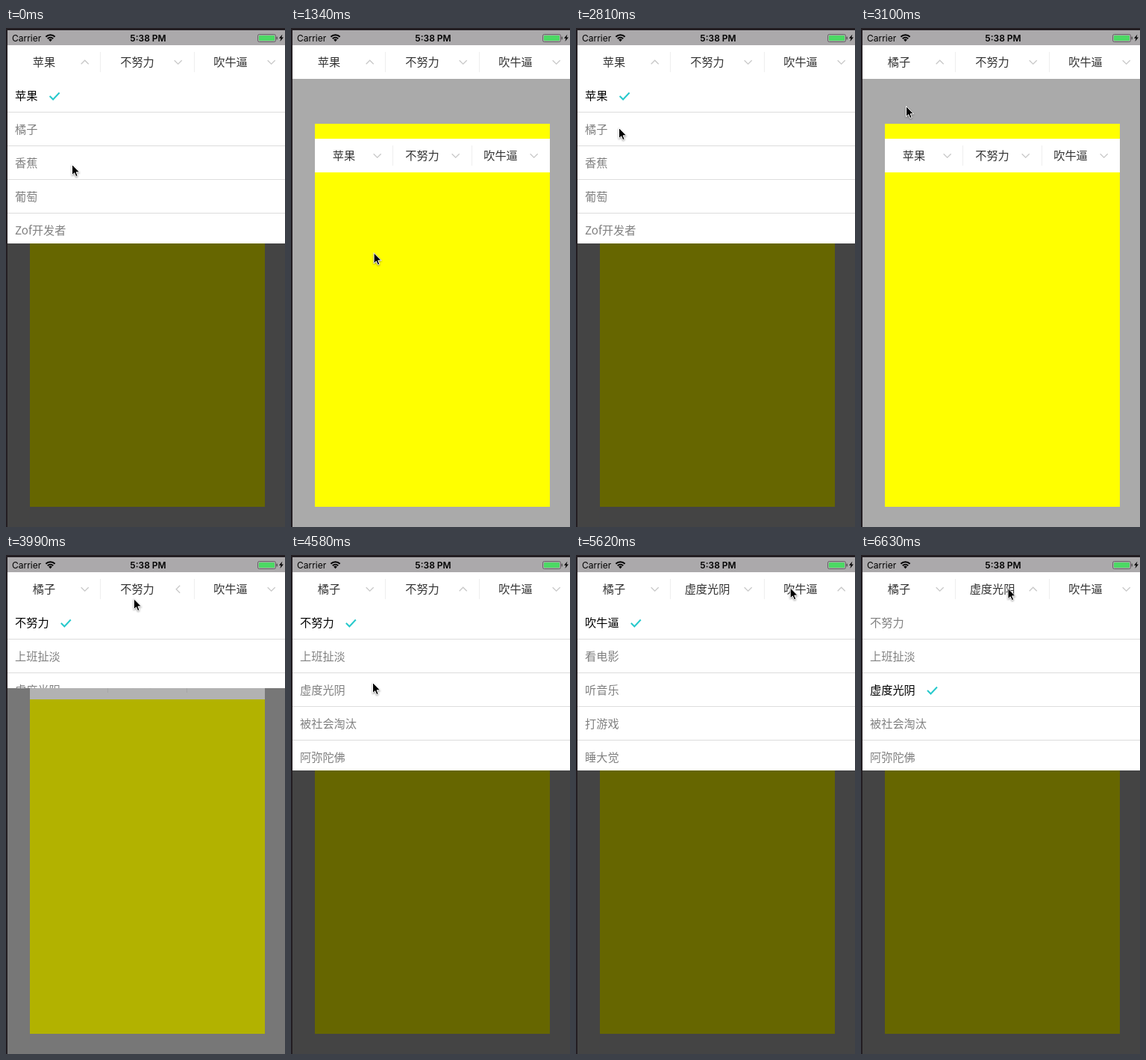
Animation, 374 px wide and 667 px high, one loop 8 s. Source, as an HTML page:

```html
<!DOCTYPE html>
<html lang="zh">
<head>
<meta charset="utf-8">
<title>Drop-down menu</title>
<style>
html, body { margin: 0; width: 100%; height: 100%; overflow: hidden; background: #aaa; }
svg { display: block; }
text { font: 15.2px "Noto Sans CJK SC", "Noto Sans CJK", sans-serif; }
.status { font: 12px Inter, sans-serif; }
.clock { font-weight: 600; text-anchor: middle; }
.title { fill: #333; text-anchor: middle; }
.arrow { fill: none; stroke: #c8c8c8; stroke-width: 1.3; }
.check { fill: none; stroke: #27c9cc; stroke-width: 2; }
.cursor { stroke: #fff; stroke-width: 1; filter: drop-shadow(0 1px 1px #0006); }
</style>
</head>
<body>
<svg id="stage" width="374" height="667" viewBox="0 0 374 667"></svg>
<script>
const LOOP = 8000;
const TOP = 68, ROW = 45, LIST = 220, EM = 15.2;

const menus = [
  ['苹果', '橘子', '香蕉', '葡萄', 'Zof开发者'],
  ['不努力', '上班扯淡', '虚度光阴', '被社会淘汰', '阿弥陀佛'],
  ['吹牛逼', '看电影', '听音乐', '打游戏', '睡大觉']
];

// Where the pointer is at each tick and what it clicks there
const steps = [
  { at: -2, x: 88, y: 182 },
  { at: -1, x: 88, y: 183 },
  { at: 1, x: 129, y: 390, close: true },
  { at: 7, x: 58, y: 43, tab: 0 },
  { at: 13, x: 57, y: 133, row: 1 },
  { at: 15, x: 60, y: 104 },
  { at: 20, x: 178, y: 45, tab: 1 },
  { at: 25, x: 109, y: 170, row: 2 },
  { at: 29, x: 309, y: 43 },
  { at: 30, x: 309, y: 43, tab: 2 },
  { at: 37, x: 196.5, y: 44, tab: 1 }
];

const clamp = u => Math.max(0, Math.min(1, u));
const ease = u => (u = clamp(u), u * u * (3 - 2 * u));
const mix = (a, b, u) => a + (b - a) * u;

function pointer(tick) {
  const i = steps.findLastIndex(s => s.at <= tick);
  const a = steps[i], b = steps[i + 1] || a;
  const u = ease((tick - a.at) / (b.at - a.at || 1));
  return [mix(a.x, b.x, u), mix(a.y, b.y, u)];
}

// Replays the clicks; a menu folds in two ticks and its arrow turns back after that
function stateAt(tick) {
  const state = { tab: 0, open: 1, turns: [1, 0, 0], picked: [0, 0, 0] };
  for (const { at, tab, row, close } of steps) {
    if (at >= tick) break;
    const opens = tab !== undefined, picks = row !== undefined;
    if (!opens && !picks && !close) continue;
    if (opens) state.tab = tab;
    if (picks) state.picked[state.tab] = row;
    const turn = opens ? ease((tick - at) / 2) : clamp(tick - at - 2);
    state.open = mix(state.open, opens ? 1 : 0, ease((tick - at) / 2));
    state.turns = state.turns.map((v, i) => mix(v, opens && i === tab ? 1 : 0, turn));
  }
  return state;
}

const rect = (x, y, w, h, fill, more = '') =>
  `<rect x="${x}" y="${y}" width="${w}" height="${h}" fill="${fill}" ${more}/>`;

function bar(x, y, w, titles, turns) {
  let s = rect(x, y, w * 3, 45, '#fff');
  titles.forEach((title, i) => {
    const mid = x + w * (i + 0.5) - 13.5;
    s += `<text class="title" x="${mid}" y="${y + 28.3}">${title}</text>
      <path class="arrow" d="M-5-2.5 0 2.5 5-2.5"
        transform="translate(${mid + w / 2 - 7.8} ${y + 22.7}) rotate(${180 * turns[i]})"/>`;
    if (i) s += rect(x + i * (w + 1) - 2, y + 9, 1, 27, '#eee');
  });
  return s;
}

function list(items, picked, open) {
  let s = `<clipPath id="fold">${rect(2, TOP, 372, LIST * open, '#000')}</clipPath>
    <g clip-path="url(#fold)">${rect(2, TOP, 372, LIST, '#fff')}`;
  items.forEach((item, i) => {
    const y = TOP + ROW * i, on = i === picked;
    s += `<text x="12" y="${y + 28.3}" fill="${on ? '#000' : '#808080'}">${item}</text>`;
    s += rect(2, y + 44, 372, 1, '#ddd');
    if (on) s += `<path class="check" d="M${28.2 + item.length * EM} ${y + 23}l4.5 4.5 8.5-9"/>`;
  });
  return s + '</g>';
}

const frame = rect(0, 0, 374, 3, '#231e22') + rect(0, 0, 2, 667, '#231e22');
const status = rect(2, 3, 372, 20, '#aba9ab') + `
  <text class="status" x="8" y="17.5">Carrier</text>
  <path d="M53.4 11.7a8.7 8.7 0 0 1 12.2 0M55.8 14.2a5.3 5.3 0 0 1 7.4 0"
    fill="none" stroke="#000" stroke-width="2"/>
  <path d="M59.5 18.2l-2.3-2.4a3.2 3.2 0 0 1 4.6 0z"/>
  <text class="status clock" x="190.5" y="17.5">5:38 PM</text>
  ${rect(337.5, 8.5, 24, 10, 'none', 'rx="2" stroke="#555" stroke-width=".8"')}
  ${rect(339, 10, 21, 7, '#4cd964', 'rx="1"')}
  ${rect(362.5, 11.5, 1.5, 4, '#555', 'rx=".7"')}
  <path d="M370.5 8.5l-4.5 5.3h2.6l-1.2 4.2 4.6-5.6h-2.7z"/>`;

function scene(tick) {
  const [x, y] = pointer(tick);
  const { tab, open, turns, picked } = stateAt(tick);
  return rect(0, 0, 374, 667, '#aaa')
    + rect(32, 128, 315, 512, '#ff0')
    + bar(32, 148, 105, menus.map(m => m[0]), [0, 0, 0])
    + rect(2, TOP, 372, 599, '#000', `opacity="${0.6 * open}"`)
    + list(menus[tab], picked[tab], open)
    + bar(2, 23, 125, menus.map((m, i) => m[picked[i]]), turns)
    + status + frame
    + `<path class="cursor" transform="translate(${x} ${y})" d="M.5.5V14.7L3.7 11.7 5.8 16.6 8.2 15.6 6.1 10.8H10.6Z"/>`;
}

// Two longer holds, then even ticks
const tickAt = t => t < 300 ? -2 : t < 890 ? -1 : Math.min(39, Math.floor((t - 890) / 147));

const stage = document.getElementById('stage');
let shown;
function draw() {
  const tick = tickAt(performance.now() % LOOP);
  if (tick !== shown) stage.innerHTML = scene(shown = tick);
  requestAnimationFrame(draw);
}
draw();
</script>
</body>
</html>
```
